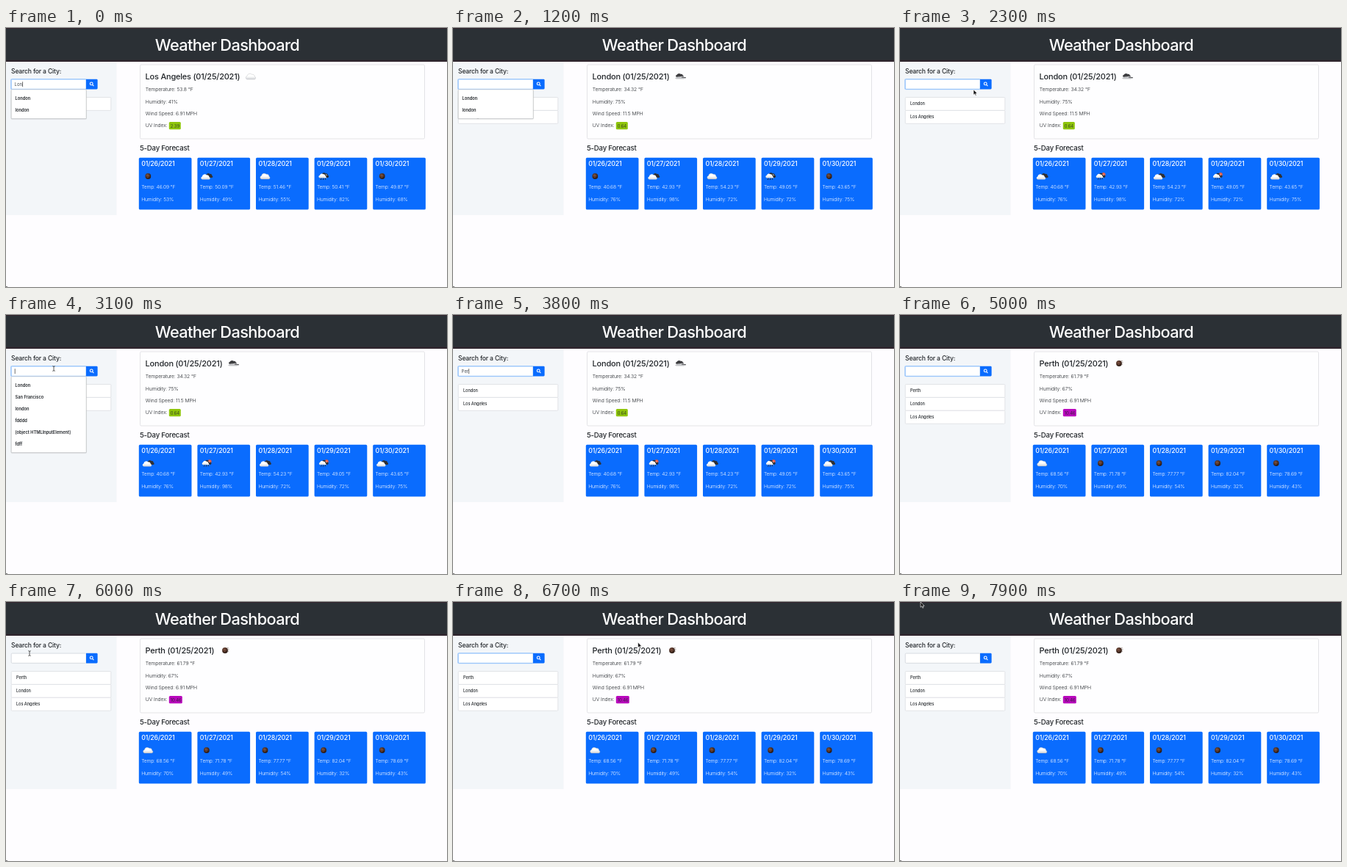
Recreate the animation shown at these times as an HTML page. Size 600x353 px, loop 8000 ms.

```html
<!DOCTYPE html>
<html lang="en">
<head>
<meta charset="utf-8">
<title>Weather Dashboard</title>
<style>
  html, body { margin: 0; width: 100%; height: 100%; overflow: hidden; background: #fefdff; }
  svg { display: block; width: 100%; height: 100%; }
  text { font-family: Inter, Roboto, "Liberation Sans", sans-serif; fill: #212529; white-space: pre; }
  .brand { font-size: 21.8px; font-weight: 500; letter-spacing: -.03em; fill: #fff; text-anchor: middle; }
  .label { font-size: 8.6px; font-weight: 500; letter-spacing: -.02em; }
  .city { font-size: 11px; font-weight: 500; letter-spacing: -.02em; }
  .section { font-size: 9.6px; font-weight: 500; letter-spacing: -.02em; }
  .body { font-size: 6.8px; font-weight: 300; letter-spacing: -.015em; }
  .date { font-size: 8.8px; font-weight: 500; letter-spacing: -.018em; fill: #fff; }
  .day { font-size: 6.7px; font-weight: 300; letter-spacing: -.02em; fill: #f4f8ff; }
  .field { font-size: 6px; fill: #495057; }
  .badge { font-size: 6.1px; font-weight: 300; letter-spacing: -.01em; }
  .item { font-size: 5.7px; font-weight: 600; }
  .past { font-size: 5.6px; font-weight: 500; letter-spacing: -.01em; }
</style>
</head>
<body>
<svg viewBox="0 0 600 353" preserveAspectRatio="none">
  <defs>
    <radialGradient id="dusk" cx=".4" cy=".35" r=".7">
      <stop offset="0" stop-color="#7b5040"/>
      <stop offset=".55" stop-color="#4a2d22"/>
      <stop offset="1" stop-color="#21140f"/>
    </radialGradient>
    <linearGradient id="puff" x1="0" y1="0" x2="0" y2="1">
      <stop offset=".45" stop-color="#fff"/>
      <stop offset="1" stop-color="#d2d4d8"/>
    </linearGradient>
    <path id="shape" d="M-4.8 4a2.3 2.3 0 0 1-.2-4.5a3.9 3.9 0 0 1 6.6-2.2a2.9 2.9 0 0 1 3.7 2.9a1.95 1.95 0 0 1-.4 3.8z"/>
    <g id="cloud">
      <use href="#shape" fill="url(#puff)" stroke="#a9abb0" stroke-width=".35"/>
    </g>
    <g id="clouds">
      <use href="#shape" transform="translate(3.2 -1) scale(.78)" fill="#303033"/>
      <use href="#shape" transform="translate(-1.4 .9) scale(.92)" fill="url(#puff)"/>
    </g>
    <g id="overcast">
      <use href="#shape" transform="translate(-.6 -1.6) scale(.8 .6)" fill="#3d3d40"/>
      <path d="M-7 2.8C-5 0-1 1 1 0S6 .6 8 2.2L5 3.4H-5z" fill="#c4c5c8"/>
      <path d="M2 1.2L8 1.7" stroke="#55565a" stroke-width="1"/>
    </g>
    <g id="rain">
      <use href="#shape" transform="translate(1.4 -1.4) scale(.85)" fill="#29292c"/>
      <use href="#shape" transform="translate(-1.6 -.6) scale(.76)" fill="url(#puff)"/>
      <path d="M-3 2.8l-.8 2.2M0 2.8l-.8 2.2M3 2.4l-.8 2.2" stroke="#222" stroke-width="1"/>
      <path d="M2.8-2.6l2 1.6M1 1.2l3 1" stroke="#fff" stroke-width=".9"/>
    </g>
    <g id="shower">
      <circle cx="4" cy="-2.4" r="2.7" fill="#e3553f"/>
      <use href="#rain" transform="scale(.92)"/>
      <circle cx="4.2" cy="-2.7" r="1.5" fill="#f1705a"/>
    </g>
    <g id="moon">
      <circle r="3.9" fill="url(#dusk)"/>
      <path d="M-2-1.4h1M.4-.4h1.2M-1 1.4h1" stroke="#99705b" stroke-width=".5"/>
    </g>
    <g id="moonlit">
      <use href="#moon"/>
      <path d="M3.4-3.6h1M4.5-1.4h.8M4.3 1h.7" stroke="#50372c" stroke-width=".8"/>
    </g>
    <g id="arrow">
      <path d="M0 0V7.2L1.7 5.7L2.8 8.2L4 7.7L2.9 5.3H5.1Z" fill="#111" stroke="#fff" stroke-width=".6"/>
    </g>
    <g id="beam" fill="none" stroke-linecap="round">
      <path d="M-1.3-3.4Q0-3.4 0-2.5V2.5Q0 3.4-1.3 3.4M1.3-3.4Q0-3.4 0-2.5M0 2.5Q0 3.4 1.3 3.4" stroke="#333" stroke-width=".8"/>
    </g>
  </defs>

  <rect width="600" height="353" fill="#fefdff"/>
  <rect width="600" height="46" fill="#2b3035"/>
  <rect width="600" height="1" fill="#33242d"/>
  <rect y="43.5" width="600" height="2.5" fill="#30262e"/>
  <text class="brand" x="301" y="31">Weather Dashboard</text>
  <rect y="46" width="150.5" height="209" fill="#f3f6f9"/>
  <text class="label" x="7" y="62">Search for a City:</text>
  <rect x="182.5" y="50" width="387" height="101" rx="1.5" fill="#fefeff" stroke="#dcdce0" stroke-width=".8"/>
  <text class="section" x="182" y="167.4">5-Day Forecast</text>
  <rect y="352" width="2" height="1" fill="#777"/>

  <g id="current"></g>
  <g id="forecast"></g>
  <g id="history"></g>
  <rect id="halo" x="6" y="68.9" width="104" height="15.4" rx="2" fill="#b9d8fd"/>
  <rect id="box" x="7.2" y="70" width="101.8" height="13.3" rx="1.2" fill="#fff" stroke-width=".8"/>
  <path d="M109 69.7H123.2a1.4 1.4 0 0 1 1.4 1.4V82.1a1.4 1.4 0 0 1-1.4 1.4H109z" fill="#0a6cfe"/>
  <g fill="none" stroke="#fff" stroke-width="1.1"><circle cx="116.2" cy="75.9" r="1.9"/><path d="M117.6 77.3L119.4 79.1"/></g>
  <text id="query" class="field" x="11.6" y="79"></text>
  <rect id="caret" y="73.2" width=".7" height="7" fill="#333"/>
  <g id="menu"></g>
  <use id="mouse"/>
</svg>
<script>
const $ = id => document.getElementById(id);
const LOOP = 8000, STEP = 100;

const places = {
  la: {
    name: 'Los Angeles', icon: 'cloud', iconX: 333, temp: '53.8', humidity: 41, wind: '6.91',
    uv: '2.39', uvColor: '#8fc60c', uvWidth: 16,
    temps: ['46.09', '50.09', '51.46', '50.41', '49.87'], damp: [53, 49, 55, 82, 68],
    icons: ['moon', 'clouds', 'cloud', 'rain', 'moon']
  },
  london: {
    name: 'London', icon: 'overcast', iconX: 309, temp: '34.32', humidity: 75, wind: '11.5',
    uv: '0.64', uvColor: '#8fc60c', uvWidth: 16,
    temps: ['40.68', '42.93', '54.23', '49.05', '43.65'], damp: [76, 98, 72, 72, 75],
    icons: ['clouds', 'shower', 'clouds', 'shower', 'clouds']
  },
  perth: {
    name: 'Perth', icon: 'moonlit', iconX: 298, temp: '61.79', humidity: 67, wind: '6.91',
    uv: '10.46', uvColor: '#b908bd', uvWidth: 18,
    temps: ['68.56', '71.78', '77.77', '82.04', '78.69'], damp: [70, 49, 54, 32, 43],
    icons: ['cloud', 'moon', 'moon', 'moon', 'moon']
  }
};

// Each track is a list of [start time, value].
const typed = [[0, 'Lon'], [200, 'Lond'], [300, 'Londo'], [400, 'London'], [600, ''],
  [3300, 'P'], [3500, 'Pe'], [3700, 'Per'], [3900, 'Pert'], [4000, 'Perth'], [4500, '']];
const past = [[0, ['Los Angeles']], [600, ['London', 'Los Angeles']], [4500, ['Perth', 'London', 'Los Angeles']]];
const numbers = [[0, 'la'], [800, 'london'], [4600, 'perth']];
const weather = [[0, 'la'], [1000, 'london'], [4800, 'perth']];
const pictures = [[0, 'la'], [1500, 'london'], [5000, 'perth']];
const focus = [[0, true], [5300, false], [6200, true], [7100, false]];
const menus = [[0, ['London', 'london']], [1700, []],
  [2700, ['London', 'San Francisco', 'london', 'fdddd', '[object HTMLInputElement]', 'fdff']], [3300, []]];
const trips = [
  [[2000, 160, 122], [2300, 100, 84], [2600, 65, 73], [3200, 65, 73]],
  [[5200, 92, 150], [5600, 52, 92], [5900, 32, 70], [6000, 32, 70], [6200, 34, 75], [6300, 48, 75],
   [6700, 251.6, 55], [6900, 230, 92], [7100, 172, 122], [7400, 110, 70], [7900, 28, 0]]
];

const entry = (track, t) => track.filter(e => e[0] <= t).pop();
const at = (track, t) => entry(track, t)[1];
const text = (cls, x, y, s) => `<text class="${cls}" x="${x}" y="${y}">${s}</text>`;
const icon = (id, x, y) => `<use href="#${id}" x="${x}" y="${y}"/>`;

function put(id, html) {
  const el = $(id);
  if (el.markup !== html) el.innerHTML = el.markup = html;
}

function drawCurrent(p) {
  const lines = [`Temperature: ${p.temp} °F`, `Humidity: ${p.humidity}%`, `Wind Speed: ${p.wind} MPH`, 'UV Index:'];
  put('current', text('city', 189.6, 69.6, `${p.name} (01/25/2021)`) + icon(p.icon, p.iconX, 66) +
    lines.map((s, i) => text('body', 189.8, 86.2 + i * 16.3, s)).join('') +
    `<rect x="221.8" y="128" width="${p.uvWidth}" height="10.2" rx="1.5" fill="${p.uvColor}"/>` +
    text('badge', 223.7, 135.5, p.uv));
}

function drawForecast(p, icons) {
  put('forecast', icons.map((name, i) => {
    const x = 180.8 + i * 79.6;
    return `<rect x="${x}" y="176.8" width="71.7" height="70.8" rx="1.6" fill="#0a6cfe"/>` +
      text('date', x + 3.4, 188.4, `01/${26 + i}/2021`) + icon(name, x + 12.5, 202) +
      text('day', x + 3.4, 219.4, `Temp: ${p.temps[i]} °F`) +
      text('day', x + 3.4, 235.8, `Humidity: ${p.damp[i]}%`);
  }).join(''));
}

function drawHistory(names) {
  put('history', names.map((s, i) => {
    const y = 94.5 + i * 17.9;
    return `<rect x="7.2" y="${y}" width="135.6" height="17.9" rx="1" fill="#fff" stroke="#dcdfe2" stroke-width=".8"/>` +
      text('past', 14, y + 10.6, s);
  }).join(''));
}

function drawMenu(items) {
  const h = items.length * 16 + 8;
  put('menu', items.length ?
    `<rect x="6.6" y="84.4" width="103.2" height="${h}" rx="1.5" fill="#000" opacity=".14"/>` +
    `<rect x="7.2" y="83.8" width="102" height="${h - .2}" rx="1" fill="#fff" stroke="#b9bcc0" stroke-width=".6"/>` +
    items.map((s, i) => text('item', 12.5, 98 + i * 16, s)).join('') : '');
}

function drawMouse(t) {
  const trip = trips.find(p => t >= p[0][0] && t <= p[p.length - 1][0]);
  $('mouse').style.display = trip ? '' : 'none';
  if (!trip) return;
  const a = entry(trip, t), b = trip[trip.indexOf(a) + 1] || a;
  const k = a === b ? 0 : (t - a[0]) / (b[0] - a[0]);
  const x = a[1] + (b[1] - a[1]) * k, y = a[2] + (b[2] - a[2]) * k;
  const overField = x > 7 && x < 109 && y > 69 && y < 84;
  $('mouse').setAttribute('href', overField ? '#beam' : '#arrow');
  $('mouse').setAttribute('transform', `translate(${x} ${y})`);
}

function drawField(t) {
  const [since, query] = entry(typed, t), focused = at(focus, t);
  // The caret restarts its blink on a key press, a click or a new focus.
  const mark = Math.max(since, entry(focus, t)[0], t >= 2700 ? 2700 : 0);
  $('halo').style.display = focused ? '' : 'none';
  $('box').setAttribute('stroke', focused ? '#7fb5f8' : '#ced4da');
  $('query').textContent = query;
  $('caret').style.display = focused && (t - mark) % 1000 < 500 ? '' : 'none';
  $('caret').setAttribute('x', 11.8 + (query ? $('query').getComputedTextLength() : 0));
}

function draw(now) {
  const t = Math.floor(now % LOOP / STEP) * STEP;
  drawCurrent(places[at(weather, t)]);
  drawForecast(places[at(numbers, t)], places[at(pictures, t)].icons);
  drawHistory(at(past, t));
  drawField(t);
  drawMenu(at(menus, t));
  drawMouse(t);
}

let start;
function tick(now) {
  start ??= now;
  draw(now - start);
  requestAnimationFrame(tick);
}
draw(0);
requestAnimationFrame(tick);
</script>
</body>
</html>
```
